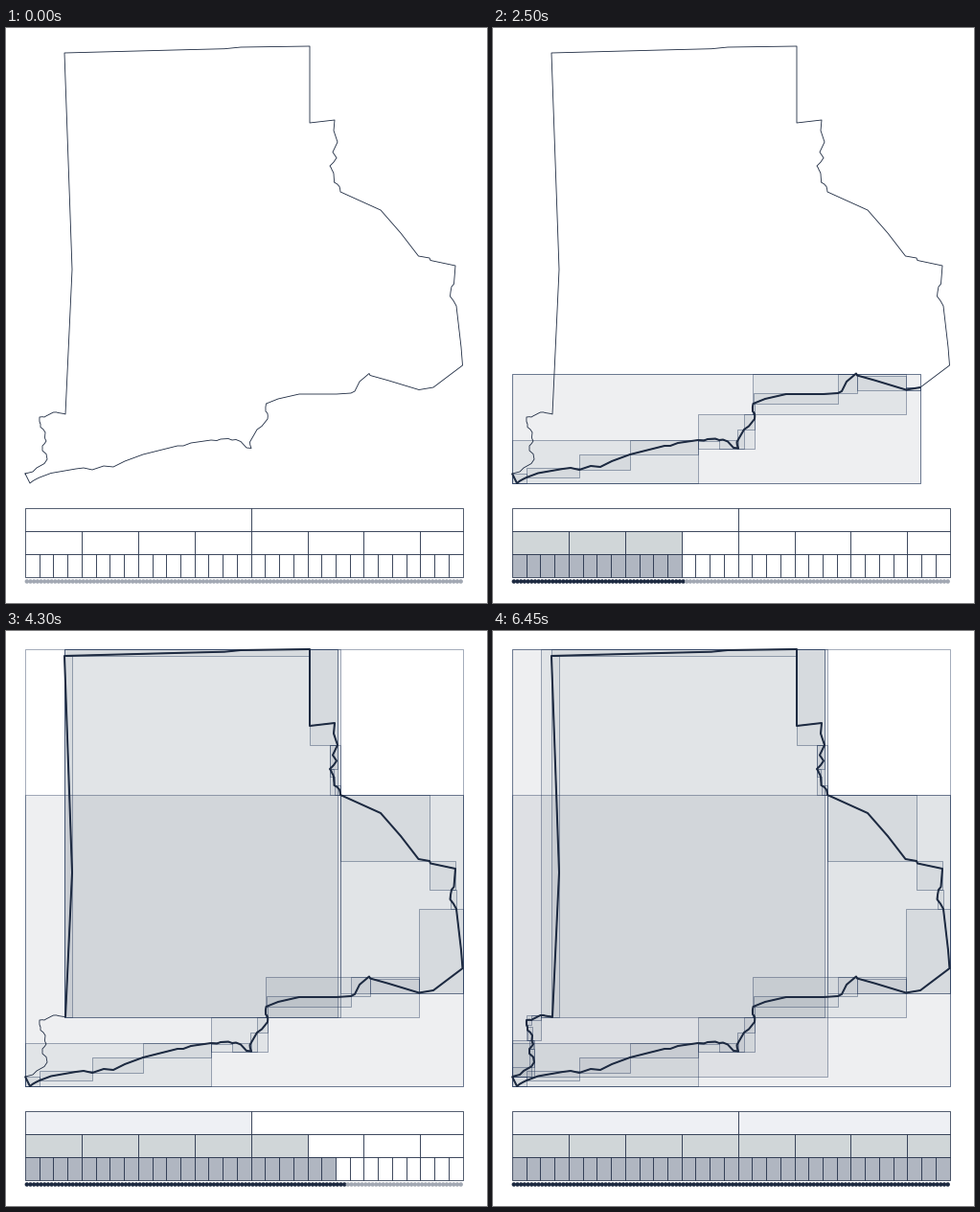
Write a matplotlib script that moves like this. It is 502x600 px and loops after 9450 ms.

```python
import random

import matplotlib.pyplot as plt
from matplotlib.animation import FuncAnimation
from matplotlib.collections import PolyCollection

W, H, DPI = 502, 600, 128  # a power of two keeps the pixel size exact
FRAME_MS, LOOP_MS = 50, 9450
START_MS, STEP_MS = 413, 42.3
PX = 72 / DPI

NAVY = "#1d2a41"
DOT_OFF = "#a2a8b3"
LEFT, RIGHT = 20, 476.5

# Index levels: segments per node, map fill, bar fill, bar top.
LEVELS = [
    (64, (0.12, 0.18, 0.30, 0.075), "#eef0f4", 500.5),
    (16, (0.07, 0.17, 0.24, 0.055), "#d0d6d8", 524.5),
    (4, (0.12, 0.18, 0.30, 0.055), "#b0b6c1", 548.5),
]
BAR_H = 24

# Each run: segments per stretch, followed by the corners it visits.
SOUTH_SHORE = [
    (1, (20, 465), (25, 475)),
    (3, (35, 469)),
    (1, (47, 464.5), (73, 460), (81, 459), (90, 461), (102, 457), (112, 458),
     (124, 452), (143, 445), (179, 436), (185, 436), (193, 433), (214, 430),
     (220, 430.5), (224, 429), (232, 428.5), (236, 430), (240, 429.5),
     (245, 431.5), (251, 438), (256, 438.5)),
    (2, (254.5, 432), (262, 419)),
    (1, (267, 415.5), (273, 408)),
    (2, (273, 402.5), (271, 400), (271.5, 392)),
    (1, (284, 387), (306, 382), (345, 382), (360, 381), (364, 379),
     (369, 369), (379, 360.5), (380, 362.5), (399, 367.8)),
    (3, (431, 377.5)),
]
EAST_SIDE = [
    (1, (446, 375), (476.5, 352), (475, 333), (470, 290)),
    (2, (463.5, 280), (465, 270)),
    (1, (467.5, 267), (469, 248), (443, 242.5), (442, 240), (430.5, 238),
     (412, 214), (391, 190), (349, 171)),
    (2, (348, 165.5), (342.5, 161)),
    (4, (342, 152), (338, 144)),
    (2, (345, 135.5)),
    (1, (341, 129.5), (346, 119), (342, 107), (343, 96), (317, 99)),
]
NORTH_WEST = [
    (1, (317, 19), (245, 20), (228, 21.7), (187, 22.7), (61, 26), (69, 252)),
    (2, (62, 403)),
    (1, (60.5, 402.5)),
    (4, (49.5, 401), (40, 406)),
    (2, (35, 406), (35, 411)),
    (4, (36, 413)),
    (1, (36, 416.5)),
    (2, (41, 422)),
    (1, (40.5, 427)),
    (2, (42, 431), (38, 436)),
    (1, (38, 441), (42, 444.5), (43, 450), (40, 454.5), (32, 459),
     (28, 463), (24, 464), (20, 465)),
]


def trace(runs):
    """Expand the runs to points; short pieces get a slight wobble."""
    rng = random.Random(4)
    pts = []
    for parts, *corners in runs:
        for x, y in corners:
            if not pts:
                pts.append((x, y))
                continue
            px, py = pts[-1]
            dx, dy = (x - px) / parts, (y - py) / parts
            amp = 0.5 if dx * dx + dy * dy < 36 else 0
            for i in range(1, parts):
                pts.append((px + dx * i + rng.uniform(-amp, amp),
                            py + dy * i + rng.uniform(-amp, amp)))
            pts.append((x, y))
    return pts


POINTS = trace(SOUTH_SHORE + EAST_SIDE + NORTH_WEST)
TOTAL = len(POINTS) - 1
UNIT = (RIGHT - LEFT) / TOTAL


def rect(x0, y0, x1, y1):
    return [(x0, y0), (x1, y0), (x1, y1), (x0, y1)]


def bounds(pts):
    xs, ys = zip(*pts)
    return rect(min(xs), min(ys), max(xs), max(ys))


def segments_at(ms):
    if ms < 400:
        return 0
    return min(TOTAL, max(1, int((ms - START_MS) / STEP_MS)))


fig = plt.figure(figsize=(W / DPI, H / DPI), dpi=DPI, facecolor="white")
ax = fig.add_axes([0, 0, 1, 1])
ax.set_xlim(0, W)
ax.set_ylim(H, 0)
ax.axis("off")

boxes = PolyCollection([], linewidths=PX, edgecolors=(0.12, 0.2, 0.34, 0.4),
                       snap=True, zorder=1)
ax.add_collection(boxes, autolim=False)

xs, ys = zip(*POINTS)
ax.plot(xs, ys, color=NAVY, lw=0.85 * PX, zorder=2)
trail, = ax.plot([], [], color=NAVY, lw=2 * PX, solid_joinstyle="round",
                 solid_capstyle="butt", zorder=3)

cells, cell_rules = [], []
for size, _, shade, top in LEVELS:
    for first in range(0, TOTAL, size):
        last = min(first + size, TOTAL)
        cells.append(rect(LEFT + first * UNIT, top,
                          LEFT + last * UNIT, top + BAR_H))
        cell_rules.append((last, shade))
bars = PolyCollection(cells, linewidths=PX, edgecolors=(0.11, 0.16, 0.26, 0.75),
                      facecolors="white", snap=True, zorder=2)
ax.add_collection(bars, autolim=False)

dots = ax.scatter([LEFT + (i + 0.5) * UNIT for i in range(TOTAL)],
                  [577.5] * TOTAL, s=(4.5 * PX) ** 2, linewidths=0, zorder=2)


def draw(frame):
    n = segments_at(frame * FRAME_MS)
    verts, fills = [], []
    if n:
        verts.append(bounds(POINTS[:n + 1]))
        fills.append((1, 1, 1, 0))
        for size, fill, _, _ in LEVELS:
            for first in range(0, n, size):
                verts.append(bounds(POINTS[first:min(first + size, n) + 1]))
                fills.append(fill)
    boxes.set_verts(verts)
    boxes.set_facecolor(fills or "none")
    trail.set_data(xs[:n + 1] if n else [], ys[:n + 1] if n else [])
    bars.set_facecolor([shade if n >= last else "white"
                        for last, shade in cell_rules])
    dots.set_facecolor([NAVY] * n + [DOT_OFF] * (TOTAL - n))
    return boxes, trail, bars, dots


anim = FuncAnimation(fig, draw, frames=LOOP_MS // FRAME_MS, interval=FRAME_MS,
                     repeat=True, repeat_delay=0, blit=False)
plt.show()
```
